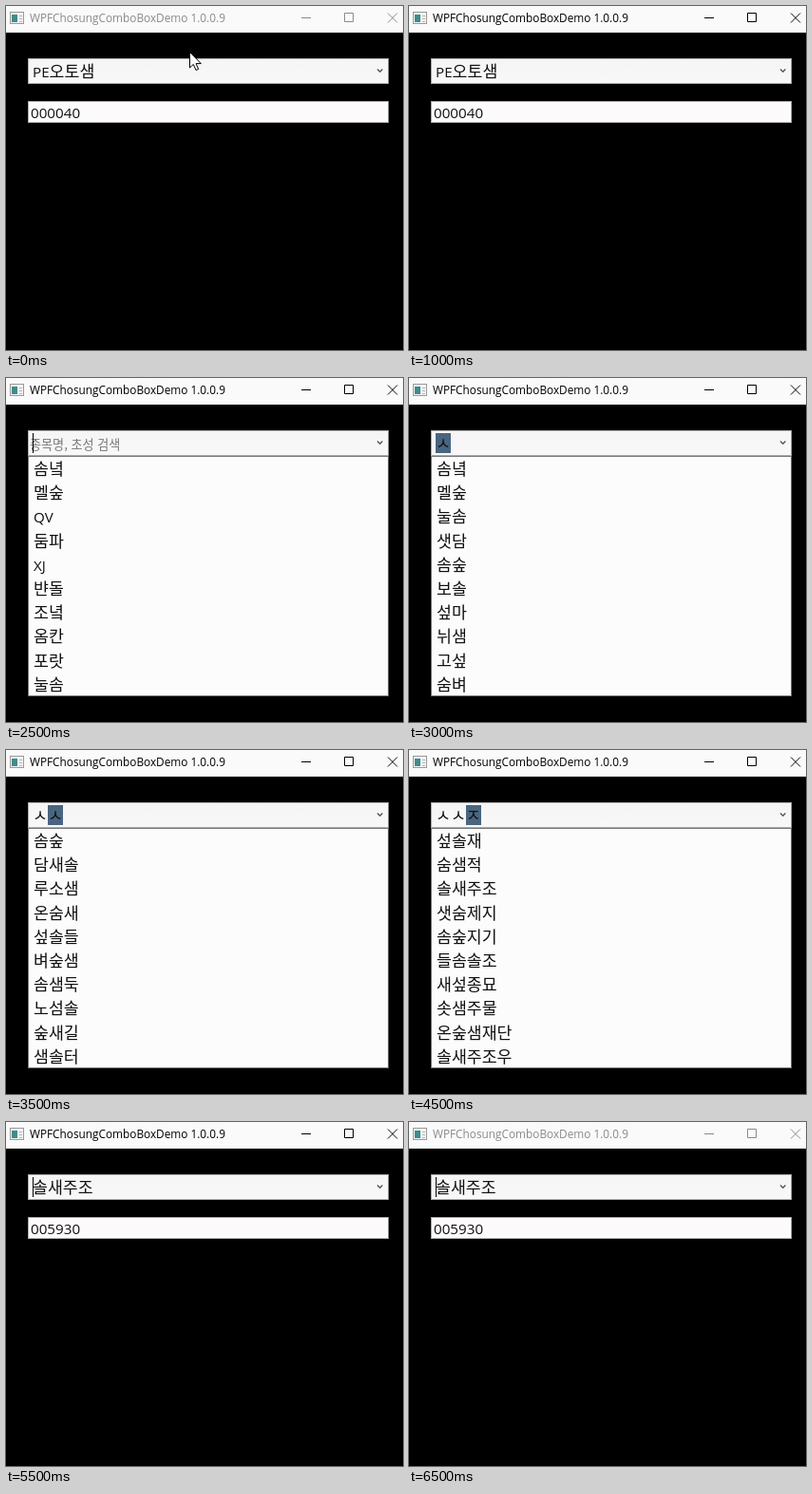
Animation of 418x362 px, one loop 7 s. Source, as an HTML page:

```html
<!DOCTYPE html>
<html lang="ko">
<head>
<meta charset="utf-8">
<title>WPFChosungComboBoxDemo</title>
<style>
  html, body { margin: 0; width: 100%; height: 100%; overflow: hidden; background: #000; }
  svg { display: block; }
  text { font: 17.3px "Noto Sans CJK KR", "Noto Sans CJK", sans-serif; fill: #111; white-space: pre; }
  .latin { font: 15.2px "Open Sans", "Noto Sans", sans-serif; }
  .hint { font-size: 13.1px; fill: #777; }
  .title { font: 11.8px "Open Sans", "Noto Sans", sans-serif; fill: currentColor; }
  .buttons { fill: none; stroke: currentColor; }
</style>
</head>
<body>
<svg width="418" height="362" viewBox="0 0 418 362">
  <defs>
    <linearGradient id="face" x2="0" y2="1">
      <stop offset="0" stop-color="#f5f5f5"/>
      <stop offset="1" stop-color="#f8f8f8"/>
    </linearGradient>
  </defs>
  <rect width="418" height="362"/>
  <rect width="418" height="28" fill="#fafafa"/>
  <g id="chrome">
    <rect x="4.5" y="6.5" width="14" height="12" fill="#f4f4f4" stroke="#999"/>
    <rect x="6" y="9" width="6" height="8" fill="#3f8c8c"/>
    <path d="M14 10.5h3M14 13.5h3M14 16.5h3" stroke="#b5b5b5"/>
    <text class="title" x="25" y="17">WPFChosungComboBoxDemo 1.0.0.9</text>
    <path class="buttons" d="M311 12.5h10M356.5 7.5h9v9h-9zM402 7.5l10 10M412 7.5l-10 10"/>
  </g>
  <rect x="23.5" y="55.5" width="379" height="26" fill="url(#face)" stroke="#acacac"/>
  <path d="M391 66.5l2.7 2.7 2.7-2.7" fill="none" stroke="#555" stroke-width="1.4"/>
  <rect x="23.5" y="100.5" width="379" height="22" fill="#fcfafa" stroke="#abadb3"/>
  <g id="scene"></g>
</svg>
<script>
const LOOP = 7000;
const LEFT = 28;       // text start inside the combo box
const CELL = 15.9;     // advance of one Korean letter
const ROW = 25.2;

const words = s => s.split(' ');
const allNames = words('솜녘 멜숲 QV 둠파 XJ 뱐돌 조녘 옴칸 포랏 눌솜');
const oneKey = words('솜녘 멜숲 눌솜 샛담 솜숲 보솔 섶마 뉘샘 고섶 숨벼');
const twoKeys = words('솜숲 담새솔 루소샘 온숨새 섶솔들 벼숲샘 솜샘둑 노섬솔 숲새길 샘솔터');
const threeKeys = words('섶솔재 숨샘적 솔새주조 샛숨제지 솜숲지기 들솜솔조 새섶종묘 솟샘주물 온숲샘재단 솔새주조우');
const fourKeys = words('솔새주조 샛숨제지 솔새주조우 PEK581솔새주조콜 노을PD37솔새주조콜 PEK419솔새주조풋 ' +
  '들녘PEJN솔새주조콜 들녘XW66솔새주조콜 들녘XW56솔새주조콜 들녘XW46솔새주조콜');

const before = { text: 'PE오토샘', code: '000040', active: true };
const after = { text: '솔새주조', code: '005930', active: true };
const typed = (text, list) => ({ ...before, text, list, composing: true });

const steps = [
  [0, { ...before, active: false, pointer: true }],
  [500, { ...before, caret: 94 }],
  [1000, before],
  [1500, { ...before, text: '바람언덕기계공업', selected: true, list: ['바람언덕기계공업'] }],
  [2500, { ...before, text: '', caret: LEFT, list: allNames }],
  [3000, typed('ㅅ', oneKey)],
  [3500, typed('ㅅㅅ', twoKeys)],
  [4500, typed('ㅅㅅㅈ', threeKeys)],
  [5000, typed('ㅅㅅㅈㅈ', fourKeys)],
  [5500, { ...after, caret: LEFT }],
  [6000, after],
  [6500, { ...after, active: false, caret: LEFT }],
];

const rect = (x, y, w, h, rest) => `<rect x="${x}" y="${y}" width="${w}" height="${h}" ${rest}/>`;
const label = (x, y, s, cls = '') => `<text class="${cls}" x="${x}" y="${y}">` +
  s.replace(/[A-Z0-9]+/g, '<tspan class="latin">$&</tspan>') + '</text>';

function popup(list) {
  const height = list.length > 1 ? 252 : 26;
  return rect(23.5, 82.5, 379, height, 'fill="#fcfcfc" stroke="#777"') +
    list.map((name, i) => label(29, Math.round(102 + i * ROW), name)).join('');
}

function field(s) {
  const end = LEFT + s.text.length * CELL;
  let out = '';
  if (s.composing) out += rect(Math.round(end - CELL), 58, 16, 21, 'fill="#4a6580"');
  out += s.text ? label(LEFT, 75, s.text) : label(25, 75, '종목명, 초성 검색', 'hint');
  if (s.selected) out += rect(LEFT, 58, 127, 21, 'fill="#0078d7" opacity=".4"');
  if (s.caret) out += rect(s.caret, 58, 1, 21, 'fill="#000"');
  return out;
}

const pointer = '<path d="M193.5 48.5v16.5l3.8-3.6 2.7 6.1 2.6-1.1-2.6-5.8h5.3z" fill="#fff" stroke="#000"/>';
const scene = document.getElementById('scene');
const chrome = document.getElementById('chrome');
let shown;

function draw(now) {
  const t = now % LOOP;
  const state = steps.findLast(([start]) => start <= t)[1];
  if (state !== shown) {
    shown = state;
    chrome.style.color = state.active ? '#000' : '#8a8a8a';
    scene.innerHTML = label(26, 118, state.code) + field(state) +
      (state.list ? popup(state.list) : '') + (state.pointer ? pointer : '');
  }
}

const origin = performance.now();
function tick() {
  draw(performance.now() - origin);
  requestAnimationFrame(tick);
}
tick();
</script>
</body>
</html>
```
